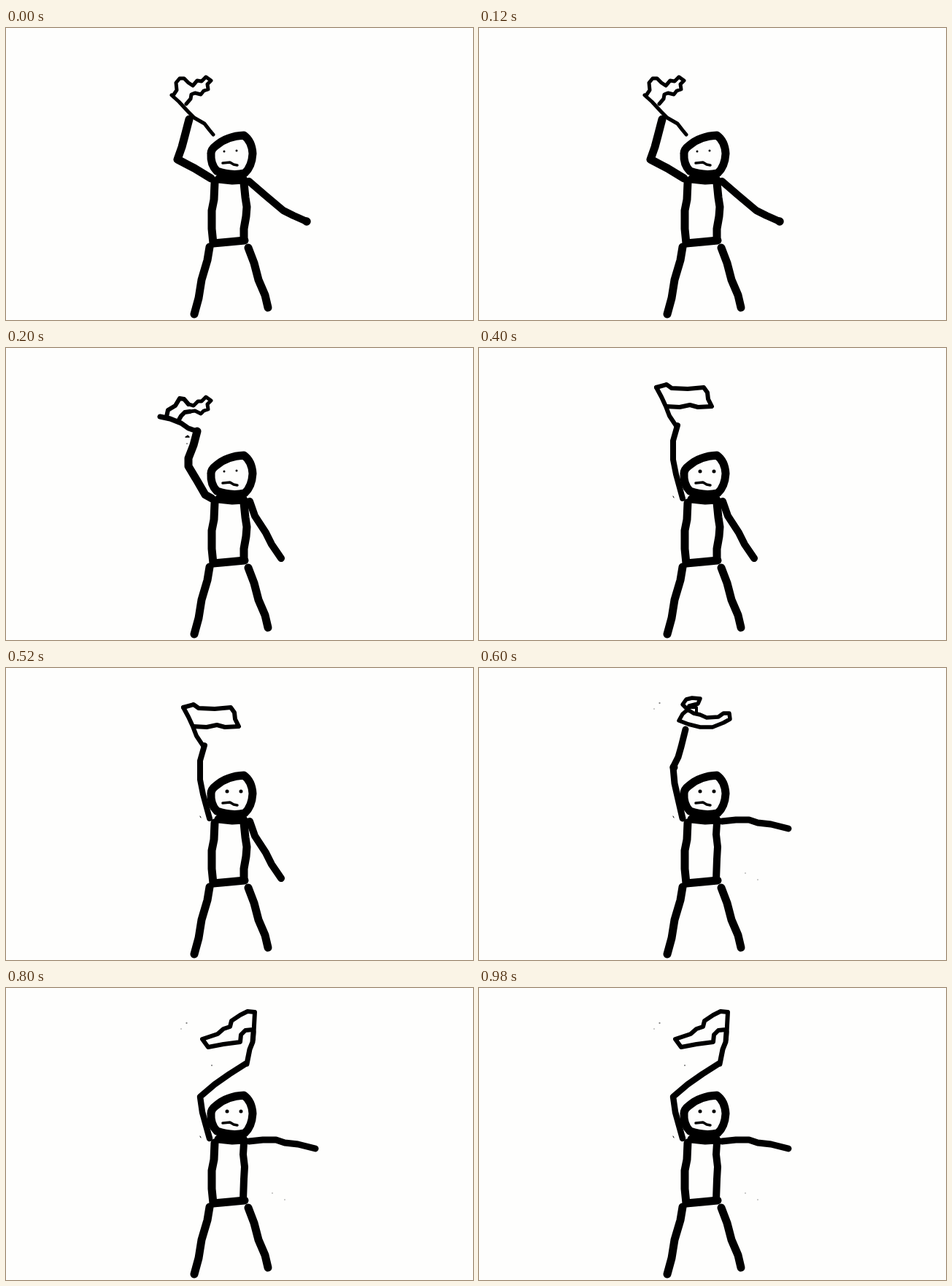
An HTML page for the animation above (1100 ms loop, 640 by 400 pixels).

```html
<!DOCTYPE html>
<html lang="en">
<head>
<meta charset="utf-8">
<title>Flag waver</title>
<style>
html, body { margin: 0; height: 100%; overflow: hidden; background: #fefefd; }
svg { display: block; width: 640px; height: 400px; }
path { fill: none; stroke: #000; stroke-linecap: round; stroke-linejoin: round; }
</style>
</head>
<body>
<svg id="stage" viewBox="0 0 640 400"></svg>
<script>
const stage = document.getElementById('stage');
const HOLD = 200, LOOP = 1100;

// Every stroke is [width, path].
const figure = [
  [11, 'M288 161Q303 148 326 147Q337 155 338 172Q337 190 327 199Q308 203 289 196Q280 187 281 172Q281 166 288 161Z'],
  [11, 'M291 207L310 209 326 208'],
  [11, 'M286 212L285 235 282 250 282 275 284 295 306 293 327 291'],
  [11, 'M279 300L276 318 268 345 264 370 258 392'],
  [11, 'M332 301L340 322 346 345 355 366 359 383'],
  [3.5, 'M297 185L307 184 312 187 317 188']
];
const sideFull = [11, 'M326 212L328 232 330 245 329 258 326 275 326 290'];
const sideThin = [10, 'M326 212L325 228 327 245 326 262 325 290'];

const eyesSmall = [3, 'M299 169h0M316 168h0'];
const eyesBig = [5, 'M303 169h0M322 169h0'];

const armDown = [10, 'M334 210L341 230 356 253 364 269 377 288'];
const armOut = [9, 'M333 210L352 208 370 208 382 212 400 214 424 220'];
const shoulderSpeck = [1, 'M266 203l1 2'];
const airSpecks = [1, 'M247 48h1M240 56h0M365 281h0M382 290h0'];

const poses = [
  [
    sideFull, eyesSmall,
    [11, 'M251 125L245 148 241 163 235 180 258 192 281 206'],
    [10, 'M333 210L355 229 380 250 394 257 412 265'],
    [11.5, 'M412 265h0'],
    [5, 'M227 92L237 101 250 115 258 123 272 131 279 140 284 146'],
    [5, 'M230 91L234 85 233 75 238 69 244 69 250 75 256 79 262 72 268 73 274 67 281 72 276 77 277 84 271 86 267 91 259 89 254 91 253 97 247 104']
  ],
  [
    sideFull, eyesSmall, armDown,
    [11, 'M262 114L257 133 250 151 250 162 262 182 273 201 282 206'],
    [7, 'M211 94L225 97 240 103 250 110 262 114'],
    [6, 'M220 94L222 85 232 79 238 69 244 70 250 77'],
    [5, 'M250 77L257 79 263 73 268 73 274 67 281 72 276 77 277 84 271 86 267 90 259 86 252 87'],
    [6, 'M252 87L245 88 240 93 236 100'],
    [1.5, 'M246 122l3-2 2 2zM248 131h0']
  ],
  [
    sideFull, eyesBig, armDown, shoulderSpeck,
    [8, 'M272 106L266 127 266 153 270 173 279 206'],
    [6, 'M243 54L250 67 256 80 261 93 271 108'],
    [6, 'M243 54L257 50 264 55 286 56 308 54 313 61 314 70 319 80 300 81 289 78 275 81 257 80']
  ],
  [
    sideThin, eyesBig, armOut, shoulderSpeck, airSpecks,
    [9, 'M283 84L277 108 273 122 266 136 268 158 279 206'],
    [11, 'M267 136h0'],
    [5.5, 'M285 56L279 50 284 43 292 41 303 42 300 49 288 52 286 57'],
    [5.5, 'M274 72L279 63 286 57 294 62 303 64 312 68 328 67 335 62 343 62 344 70 335 75 320 81 303 81 287 77Z'],
    [4, 'M289 54L298 54 298 62']
  ],
  [
    sideThin, eyesBig, armOut, shoulderSpeck, airSpecks,
    [8.5, 'M328 104L306 118 286 132 266 149 269 170 279 206'],
    [7, 'M339 60L338 74 334 84 330 104'],
    [6, 'M339 70L341 33 331 32 321 37 309 45 307 53 298 56 290 63 269 70 277 81 298 77 321 74 322 64 328 58 338 57'],
    [1.5, 'M282 106h0']
  ]
];

const draw = strokes => strokes
  .map(([width, d]) => `<path stroke-width="${width}" d="${d}"/>`).join('');

stage.innerHTML = draw(figure) + poses.map(p => `<g>${draw(p)}</g>`).join('');
const groups = [...stage.querySelectorAll('g')];

const start = performance.now();
function tick(now) {
  const t = Math.max(0, now - start) % LOOP;
  const shown = Math.min(poses.length - 1, Math.floor(t / HOLD));
  groups.forEach((g, i) => g.style.display = i === shown ? '' : 'none');
  requestAnimationFrame(tick);
}
tick(start);
</script>
</body>
</html>
```
